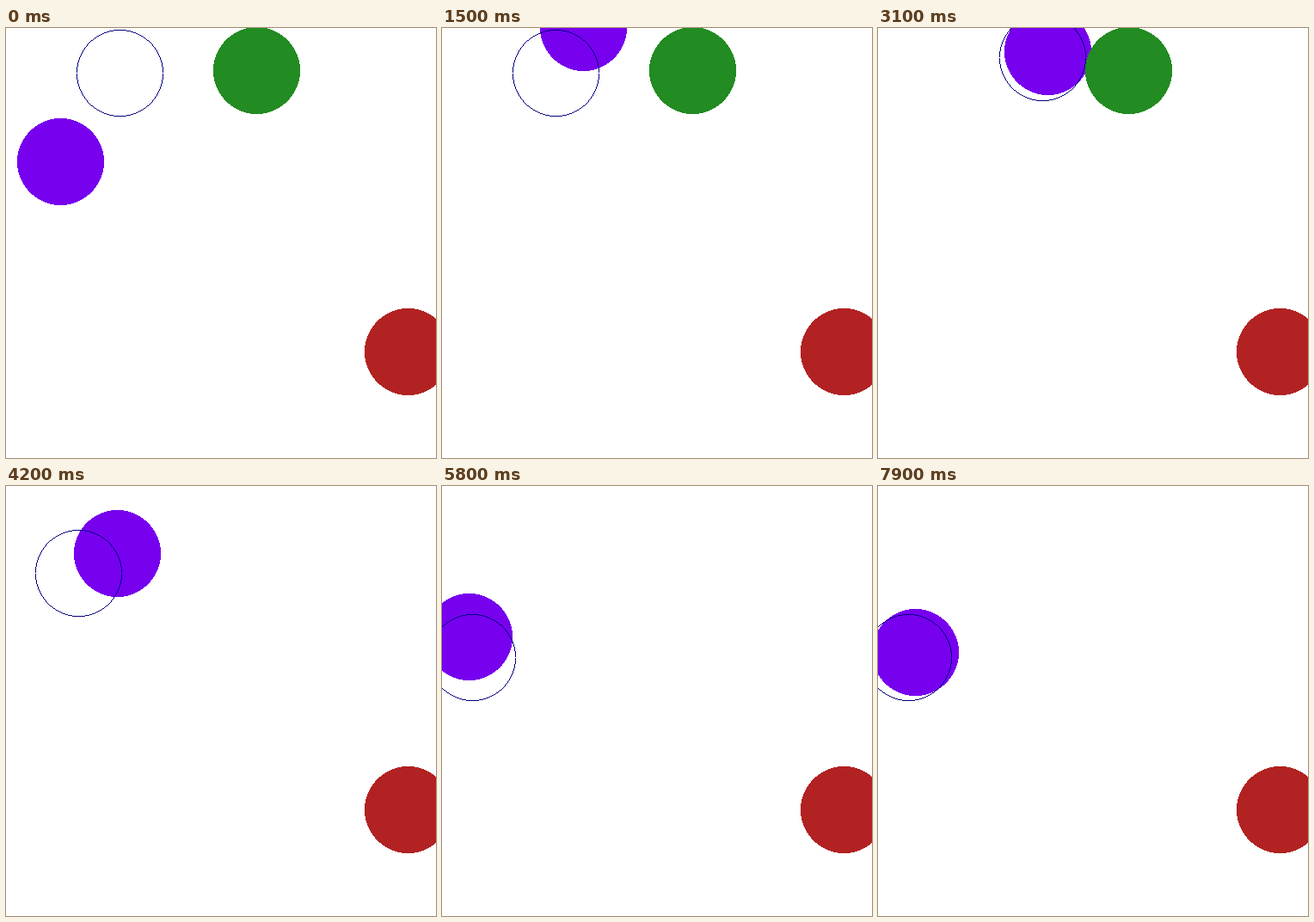
These frames come from a looping animation (500 px wide and 500 px high, 8 s). An HTML page with a canvas:

```html
<!DOCTYPE html>
<html lang="en">
<head>
<meta charset="utf-8">
<title>Chasing circle</title>
<style>
html, body { margin: 0; width: 100%; height: 100%; overflow: hidden; background: #fff; }
canvas { display: block; }
</style>
</head>
<body>
<canvas id="stage" width="500" height="500"></canvas>
<script>
const STEP = 100, STEPS = 80, GREEN_END = 35, RADIUS = 50, DAMPING = 0.45;

// Turning points of the ball, and the goals it swings past
const turns = [
  { at: 0, x: 63.5, y: 155.5 },
  { at: 19, x: 174.4, y: -15.7 },
  { at: 36, x: 202.3, y: 37 },
  { at: 51, x: 12.8, y: 144.5 },
  { at: 69, x: 64.5, y: 229 },
  { at: 85, x: 35.5, y: 180 }
];
const goals = [
  { at: 0, x: 132, y: 52 },
  { at: 19, x: 191, y: 34 },
  { at: 35, x: 84, y: 101 },
  { at: 50, x: 35, y: 199 }
];

const ctx = document.getElementById("stage").getContext("2d");
const lastIndex = (list, step) => list.findLastIndex(item => item.at <= step);

// Half a swing of a damped spring, at rest at both ends
function swing(u) {
  const a = Math.PI * u;
  const wave = Math.cos(a) + DAMPING / Math.PI * Math.sin(a);
  return (1 - Math.exp(-DAMPING * u) * wave) / (1 + Math.exp(-DAMPING));
}

function ballAt(step) {
  const i = lastIndex(turns, step), p = turns[i], q = turns[i + 1];
  const f = swing((step - p.at) / (q.at - p.at));
  return { x: Math.floor(p.x + (q.x - p.x) * f), y: Math.floor(p.y + (q.y - p.y) * f) };
}

// Calls visit(d, reach) for the rows and columns within 45 degrees of an axis
function scan(visit) {
  const limit = Math.round(RADIUS * Math.SQRT1_2);
  for (let d = -limit; d <= limit; d++) visit(d, Math.round(Math.sqrt(RADIUS ** 2 - d * d)));
}

function disk({ x, y }, color) {
  ctx.fillStyle = color;
  scan((d, r) => {
    ctx.fillRect(x - r, y + d, 2 * r + 1, 1);
    ctx.fillRect(x + d, y - r, 1, 2 * r + 1);
  });
}

// One pixel wide, open at the far left and right
function ring({ x, y }, color) {
  ctx.fillStyle = color;
  scan((d, r) => {
    for (const side of [-r, r]) {
      ctx.fillRect(x + d, y + side, 1, 1);
      if (d) ctx.fillRect(x + side, y + d, 1, 1);
    }
  });
}

function draw(time) {
  const step = Math.floor(time / STEP) % STEPS;
  ctx.clearRect(0, 0, 500, 500);
  disk(ballAt(step), "#7700ee");
  if (step < GREEN_END) disk({ x: 291, y: 49 }, "#228b22");
  disk({ x: 467, y: 376 }, "#b22222");
  ring(goals[lastIndex(goals, step)], "#000080");
}

const start = performance.now();
function tick() {
  draw(performance.now() - start);
  requestAnimationFrame(tick);
}
tick();
</script>
</body>
</html>
```
